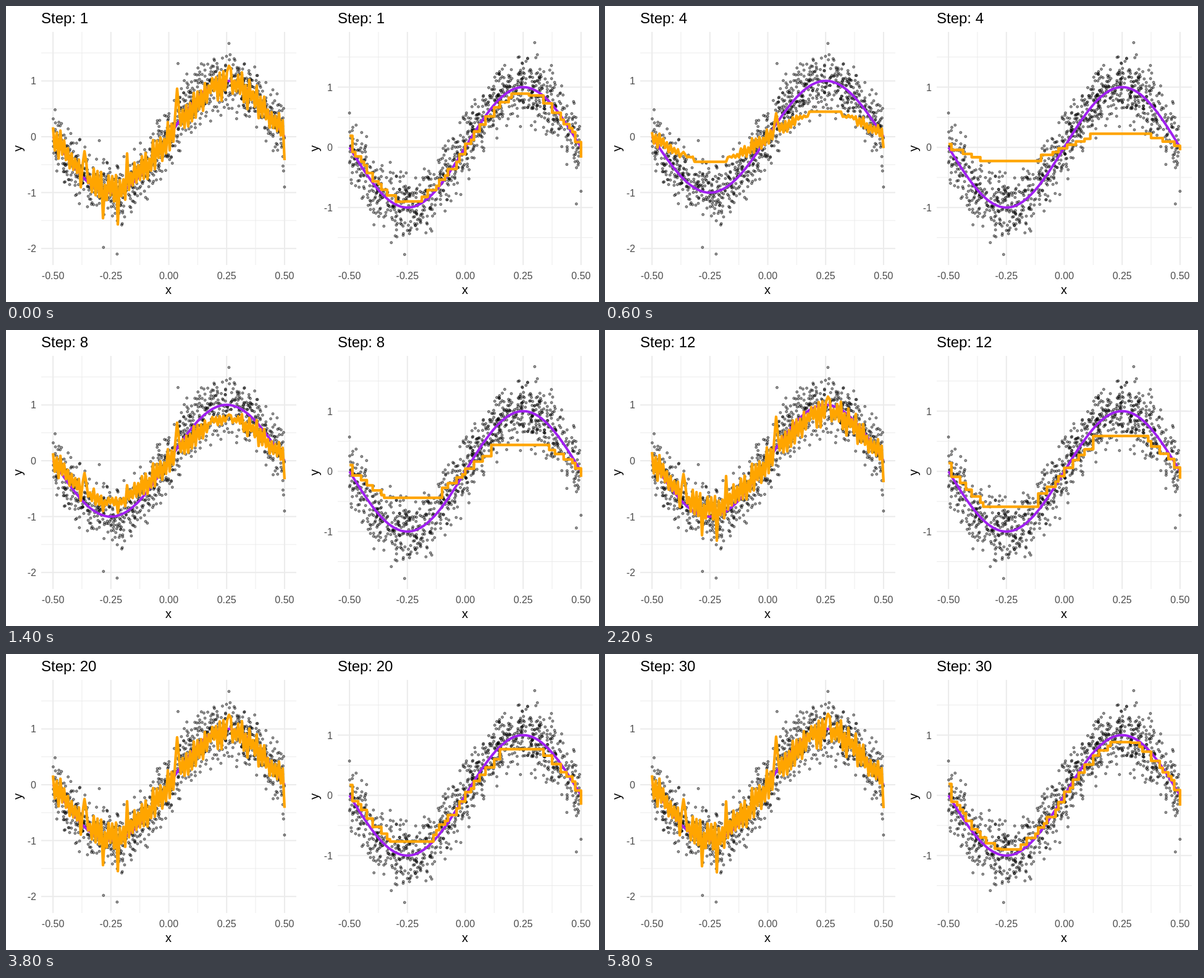
Write an HTML page with a canvas that moves like this. It is 960 px wide and 480 px high and loops after 8 s.

```html
<!DOCTYPE html>
<html>
<head>
<meta charset="utf-8">
<title>Boosting steps</title>
<style>
  html, body { margin: 0; width: 100%; height: 100%; overflow: hidden; background: #fff; }
  canvas { display: block; }
</style>
</head>
<body>
<canvas id="stage" width="960" height="480"></canvas>
<script>
const FONT = '"Liberation Sans", Arial, sans-serif';
const LOOP = 8000, STEP_TIME = 200, STEPS = 30;
const X_UNIT = 374.8;
const ctx = document.getElementById('stage').getContext('2d');

// Key points and outliers are [x, y] in data units.
const panels = [
  { left: 57, y0: 212, yUnit: 90.6, yMin: -2, seed: 7654321, samples: 126,
    fit: spikyLine, noise: (random, i) => (i % 2 ? -1 : 1) * (0.06 + 0.24 * random()),
    keyPoints: [[-0.5, 0.17], [-0.364, -0.26], [-0.284, -1.46], [-0.222, -1.57], [-0.178, -0.3],
      [-0.072, -0.06], [0.038, 0.86], [0.26, 1.27], [0.5, -0.42]],
    outliers: [[-0.223, -2.1], [-0.282, -1.98], [-0.3, -0.07], [0.04, 1.31], [0.26, 1.67], [0.5, -0.9]] },
  { left: 537, y0: 229.2, yUnit: 97.6, yMin: -1, seed: 2345678, samples: 81,
    fit: stairLine, noise: random => 0.1 * (random() - 0.5),
    keyPoints: [[-0.5, 0.2], [0.5, -0.18]],
    outliers: [[-0.262, -1.78], [-0.5, 0.57], [0.3, 1.74], [0.48, -0.94], [0.5, -0.73]] }
];

const clamp01 = v => Math.min(1, Math.max(0, v));
const wave = x => Math.sin(2 * Math.PI * x);
const toX = (p, x) => p.left + 206.5 + X_UNIT * x;
const toY = (p, y) => p.y0 - p.yUnit * y;

function randomFrom(seed) {
  return () => (seed = (seed * 16807) % 2147483647) / 2147483647;
}

// The fit that boosting converges to: a damped wave with noise, pulled to the key points.
function makeTarget(p) {
  const random = randomFrom(p.seed + 1);
  const last = p.samples - 1;
  const target = Array.from({ length: p.samples }, (_, i) => {
    const x = i / last - 0.5;
    return { x, y: 0.94 * wave(x) + p.noise(random, i) };
  });
  p.keyPoints.forEach(([x, y]) => { target[Math.round((x + 0.5) * last)].y = y; });
  return target;
}

// Detail spreads from the zero crossings towards the peaks as rounds are added.
function spikyLine(p, rounds) {
  const gain = 1 - 0.8 ** rounds;
  return p.target.map(({ x, y }) => {
    const s = wave(x), base = 0.92 * Math.round(s * 5) / 5;
    const detail = clamp01((0.9 + 0.06 * (rounds - 3) - Math.abs(s)) / 0.4);
    return [toX(p, x), toY(p, gain * (base + detail * (y - base)))];
  });
}

// Neighbouring samples share a tread when close in value or both on a peak.
function stairLine(p, rounds) {
  const gain = 1 - 0.9 ** rounds;
  const tolerance = 0.06 + 0.2 * 0.86 ** rounds;
  const peakHalf = 0.13 * (1 - (rounds / 36) ** 2);
  const treads = [];
  p.target.forEach(({ x, y }) => {
    const peak = Math.abs(Math.abs(x) - 0.235) < peakHalf;
    let tread = treads[treads.length - 1];
    if (!tread || tread.peak !== peak || (!peak && Math.abs(y - tread.values[0]) > tolerance)) {
      tread = { x, peak, values: [] };
      treads.push(tread);
    }
    tread.values.push(y);
  });
  return treads.flatMap(({ x, values }, i) => {
    const mean = values.reduce((a, b) => a + b) / values.length;
    const end = i + 1 < treads.length ? treads[i + 1].x : 0.5;
    const y = toY(p, gain * mean);
    return [[toX(p, x), y], [toX(p, end), y]];
  });
}

function polyline(c, points, color, width) {
  c.beginPath();
  points.forEach(([x, y]) => c.lineTo(x, y));
  c.strokeStyle = color;
  c.lineWidth = width;
  c.lineJoin = 'round';
  c.stroke();
}

function label(c, text, x, y, size, color, align) {
  c.font = `${size}px ${FONT}`;
  c.fillStyle = color;
  c.textAlign = align;
  c.fillText(text, x, y);
}

function drawGrid(c, p) {
  const grey = '#ebebeb', textGrey = '#4d4d4d';
  const vertical = (x, w) => polyline(c, [[toX(p, x), 42], [toX(p, x), 420]], grey, w);
  const horizontal = (y, w) => polyline(c, [[p.left, toY(p, y)], [p.left + 413, toY(p, y)]], grey, w);
  for (let x = -0.375; x < 0.5; x += 0.25) vertical(x, 1);
  for (let y = -1.5; y < 2; y++) horizontal(y, 1);
  for (let x = -0.5; x <= 0.5; x += 0.25) {
    vertical(x, 2);
    label(c, x.toFixed(2), toX(p, x), 443, 16, textGrey, 'center');
  }
  for (let y = p.yMin; y <= 1; y++) {
    horizontal(y, 2);
    label(c, y, p.left - 8, toY(p, y) + 6, 16, textGrey, 'right');
  }
  label(c, 'x', p.left + 206, 467, 20, '#000', 'center');
  c.save();
  c.translate(p.left - 31, 231);
  c.rotate(-Math.PI / 2);
  label(c, 'y', 0, 0, 20, '#000', 'center');
  c.restore();
}

function drawDots(c, p) {
  const random = randomFrom(p.seed);
  const dot = (x, y) => {
    c.beginPath();
    c.arc(toX(p, x), toY(p, y), 2, 0, 2 * Math.PI);
    c.fill();
    c.stroke();
  };
  c.fillStyle = 'rgba(0,0,0,0.4)';
  c.strokeStyle = 'rgba(0,0,0,0.5)';
  c.lineWidth = 1;
  for (let i = 0; i < 990; i++) {
    const x = random() - 0.5;
    const noise = (random() + random() + random() - 1.5) / 2;
    dot(x, wave(x) + noise);
  }
  p.outliers.forEach(([x, y]) => dot(x, y));
}

function makeBackdrop() {
  const layer = document.createElement('canvas');
  layer.width = 960;
  layer.height = 480;
  const c = layer.getContext('2d');
  c.fillStyle = '#fff';
  c.fillRect(0, 0, 960, 480);
  panels.forEach(p => {
    drawGrid(c, p);
    drawDots(c, p);
    const curve = Array.from({ length: 201 }, (_, i) => {
      const x = i / 200 - 0.5;
      return [toX(p, x), toY(p, wave(x))];
    });
    polyline(c, curve, '#a020f0', 4);
  });
  return layer;
}

panels.forEach(p => { p.target = makeTarget(p); });
const backdrop = makeBackdrop();

function draw(now) {
  const step = Math.min(STEPS, 1 + Math.floor((now % LOOP) / STEP_TIME));
  // The first step shows the finished fit; the second starts again from one round.
  const rounds = step === 1 ? STEPS : step - 1;
  ctx.drawImage(backdrop, 0, 0);
  panels.forEach(p => {
    polyline(ctx, p.fit(p, rounds), '#ffa500', 4.3);
    label(ctx, 'Step: ' + step, p.left, 28, 24, '#000', 'left');
  });
}

const start = performance.now();
function tick() {
  draw(performance.now() - start);
  requestAnimationFrame(tick);
}
tick();
</script>
</body>
</html>
```
